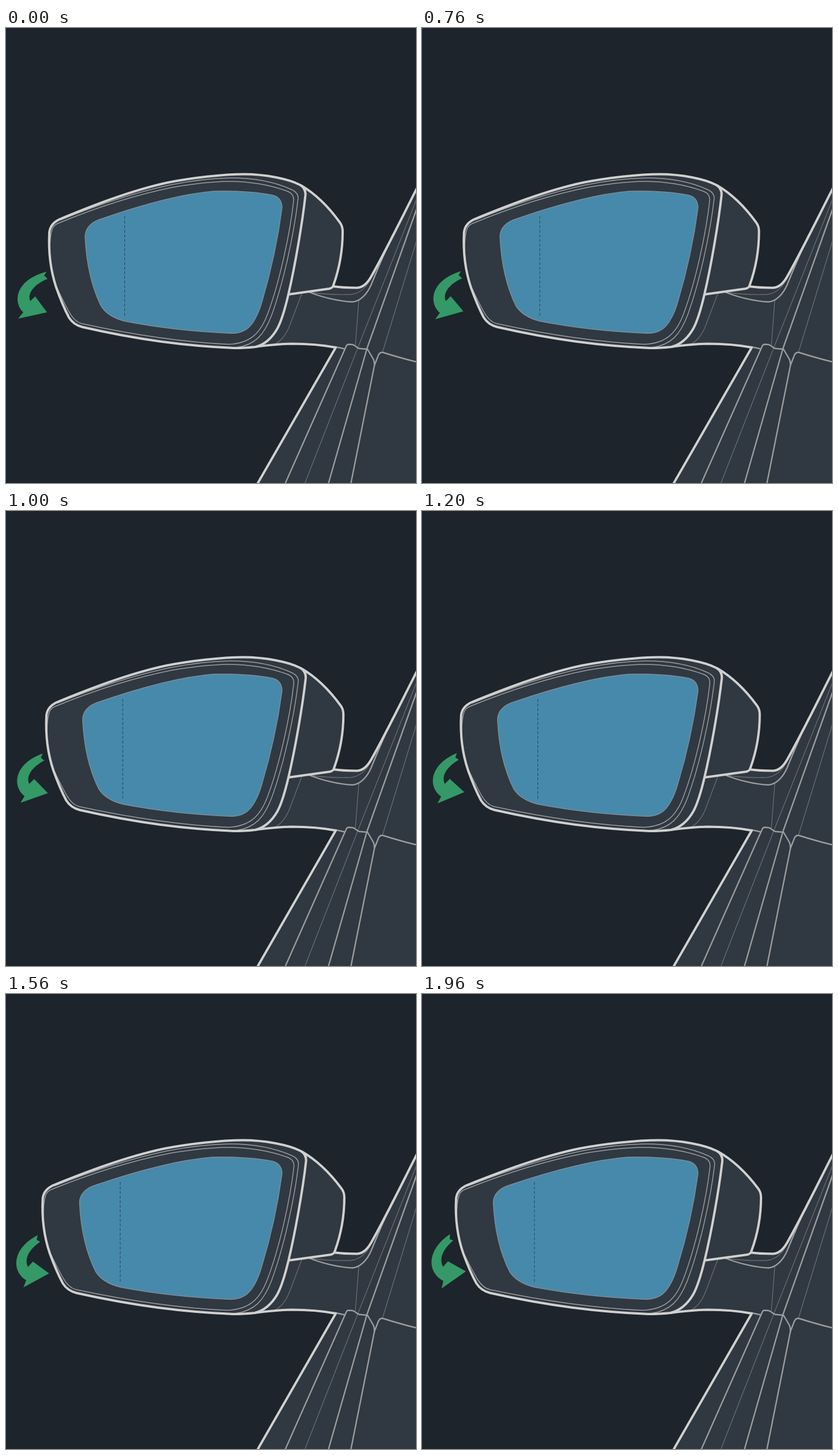
These frames come from a looping animation (710 px wide and 789 px high, 2520 ms). An HTML page with a canvas:

```html
<!DOCTYPE html>
<html lang="en">
<head>
<meta charset="utf-8">
<title>Door mirror</title>
<style>
html, body { margin: 0; width: 100%; height: 100%; overflow: hidden; background: #1e242b; }
canvas { display: block; width: 710px; height: 789px; }
</style>
</head>
<body>
<canvas id="stage" width="710" height="789"></canvas>
<script>
const ctx = document.getElementById('stage').getContext('2d');
const LOOP = 2520, STEP = 40, START = 600, STEPS = 35;
const PIVOT = 480, STRETCH = 0.0395;
const BACK = '#1e242b', BODY = '#303841', GLASS = '#4789aa', ARROW = '#349966';
const BRIGHT = '#d0d0d0', MID = '#9b9c9d', DIM = '#696d72';

const path = d => new Path2D(d);

// Fixed parts: door pillar and mirror arm
const body = path('M489 462 L566 448 C580 450 595 450.5 608 450.5 C618 450 627 441 633 430 C660 382 685 330 712 277 ' +
  'L712 791 L435 791 L571 554 C535 548 500 546 470 549 L432 553 Z');
const fixedLines = [
  [DIM, 1.3, 'M512 461 L492 514 C485 533 476 545 461 550'],
  [DIM, 1.3, 'M525 458 C545 461 575 463 598 462 C613 460 624 450 632 434'],
  [DIM, 1.3, 'M611 472 L605 549'],
  [DIM, 1.3, 'M711 297 L609 555 L517 791'],
  [DIM, 1.3, 'M711 369 L652 562'],
  [MID, 2.4, 'M525 458 C545 466 575 474 600 475 C613 474 625 462 632 446 C643 419 655 391 670 358'],
  [MID, 2.4, 'M711 314 L625 556 L558 791'],
  [MID, 2.4, 'M571 553 L587 556.5 L590 550 Q591 548.5 594 548.5 L600 549 C606 550 607 556 614 556 ' +
    'L626 557 L636 574 Q638 578 638 585 L645 567 Q648 561 654 563 C670 568 690 574 711 579'],
  [MID, 2.4, 'M587 556.5 L483 791'],
  [MID, 2.4, 'M638 585 L597 791'],
  [BRIGHT, 4, 'M566 448 C580 450 595 450.5 608 450.5 C618 450 627 441 633 430 C660 382 685 330 712 277'],
  [BRIGHT, 4, 'M430 553 C460 549 475 548 495 547.5 C525 547.5 550 550 571 554 L435 791']
].map(([color, width, d]) => [color, width, path(d)]);

// Moving parts, at rest pose
const cover = path('M511 273 C540 290 560 312 578 337 C582 342 583 346 583 353 C583 385 578 415 567 446 ' +
  'C566 450 564 451 560 452 L489 462');
const shell = path('M92 332 C145 310 215 282 280 268 C320 260 375 253.5 412 253.5 C450 253.5 490 262 509 272 ' +
  'C516 276 519 283 518.5 290 C513 340 500 415 489 462 C482 492 477 508 470 521 C461 537 448 549 432 553 ' +
  'C415 555 405 555 395 555 C310 551 230 541 132 518.5 C122 516 114 510 109 502 C99 483 93 467 87 450 ' +
  'C77 420 73.5 385 75 355 C76 344 82 337 92 332 Z');
const rims = [
  'M76 385 C76 370 77 358 80 349 C82 343 86 340 92 338 C150 314 220 290 290 276 C325 270 355 266.5 385 266 ' +
    'C425 266 460 273 487 283 C495 286 499 291 498 300 C492 355 474 440 453 496 C441 528 424 547 386 548.5 ' +
    'C310 545 220 532 131 512.5 C121 510 114 501 109 492 C100 475 94 463 89 452',
  'M94 333 C160 306 220 286 285 272 C325 264 355 260.5 390 260 C435 260 470 269 494 280 C503 284 507 290 505.5 298 ' +
    'C499 355 481 440 460 498 C447 532 432 549 400 554'
].map(path);
const glass = path('M165 331 C225 310 300 288 360 283 C400 282 440 285 462 290 C473 293 478 301 478 312 ' +
  'C471 365 458 425 444 472 C440 487 435 498 431 505 C422 522 410 529 392 529.5 C330 527 260 519 206 508.5 ' +
  'C185 503 171 493 164 481 C148 448 139 405 137 362 C137 347 148 336 165 331 Z');
const divider = path('M205.5 326 V501');

// Arrow outline at both ends of the move
const arrowA = [70.5,422.5, 66,429, 72,435, 52,443, 36,458, 42,473.5, 50.5,465.5, 71,493, 21,504, 30,493,
  12,476, 15,437, 70.5,422.5];
const arrowB = [48.5,416.5, 48,425, 54,427.5, 39,440, 28,457, 36.5,473, 45,463.5, 76,481, 34,510.5, 37,497.5,
  9,483, 7,444, 48.5,416.5];

function stroke(shape, color, width) {
  ctx.strokeStyle = color;
  ctx.lineWidth = width;
  ctx.stroke(shape);
}

function fill(shape, color) {
  ctx.fillStyle = color;
  ctx.fill(shape);
}

function drawArrow(p) {
  const v = arrowA.map((a, i) => a + (arrowB[i] - a) * p);
  const at = (i, n) => v.slice(i * 2, (i + n) * 2);
  ctx.beginPath();
  ctx.moveTo(...at(0, 1));
  ctx.lineTo(...at(1, 1));
  ctx.lineTo(...at(2, 1));
  ctx.bezierCurveTo(...at(3, 3));
  for (let i = 6; i < 10; i++) ctx.lineTo(...at(i, 1));
  ctx.bezierCurveTo(...at(10, 3));
  ctx.fillStyle = ARROW;
  ctx.fill();
}

function draw(p) {
  const scale = 1 + STRETCH * p;
  const matrix = new DOMMatrix([scale, 0, 0, 1, PIVOT * (1 - scale), 0]);
  const widen = shape => {
    const out = new Path2D();
    out.addPath(shape, matrix);
    return out;
  };

  ctx.fillStyle = BACK;
  ctx.fillRect(0, 0, 710, 789);
  fill(body, BODY);
  for (const [color, width, shape] of fixedLines) stroke(shape, color, width);

  const side = widen(cover), frame = widen(shell), pane = widen(glass);
  fill(side, BODY);
  stroke(side, BRIGHT, 4);
  fill(frame, BODY);
  for (const rim of rims) stroke(widen(rim), MID, 1.5);
  stroke(frame, BRIGHT, 4);
  fill(pane, GLASS);
  stroke(pane, '#7b8d98', 1.5);

  ctx.lineCap = 'butt';
  ctx.setLineDash([5, 3]);
  stroke(widen(divider), '#24465c', 1);
  ctx.setLineDash([]);
  ctx.lineCap = 'round';

  drawArrow(p);
}

function tick() {
  const t = performance.now() % LOOP;
  const step = Math.floor((t - START) / STEP) + 1;
  draw(Math.min(Math.max(step, 0), STEPS) / STEPS);
  requestAnimationFrame(tick);
}

ctx.lineCap = ctx.lineJoin = 'round';
tick();
</script>
</body>
</html>
```
